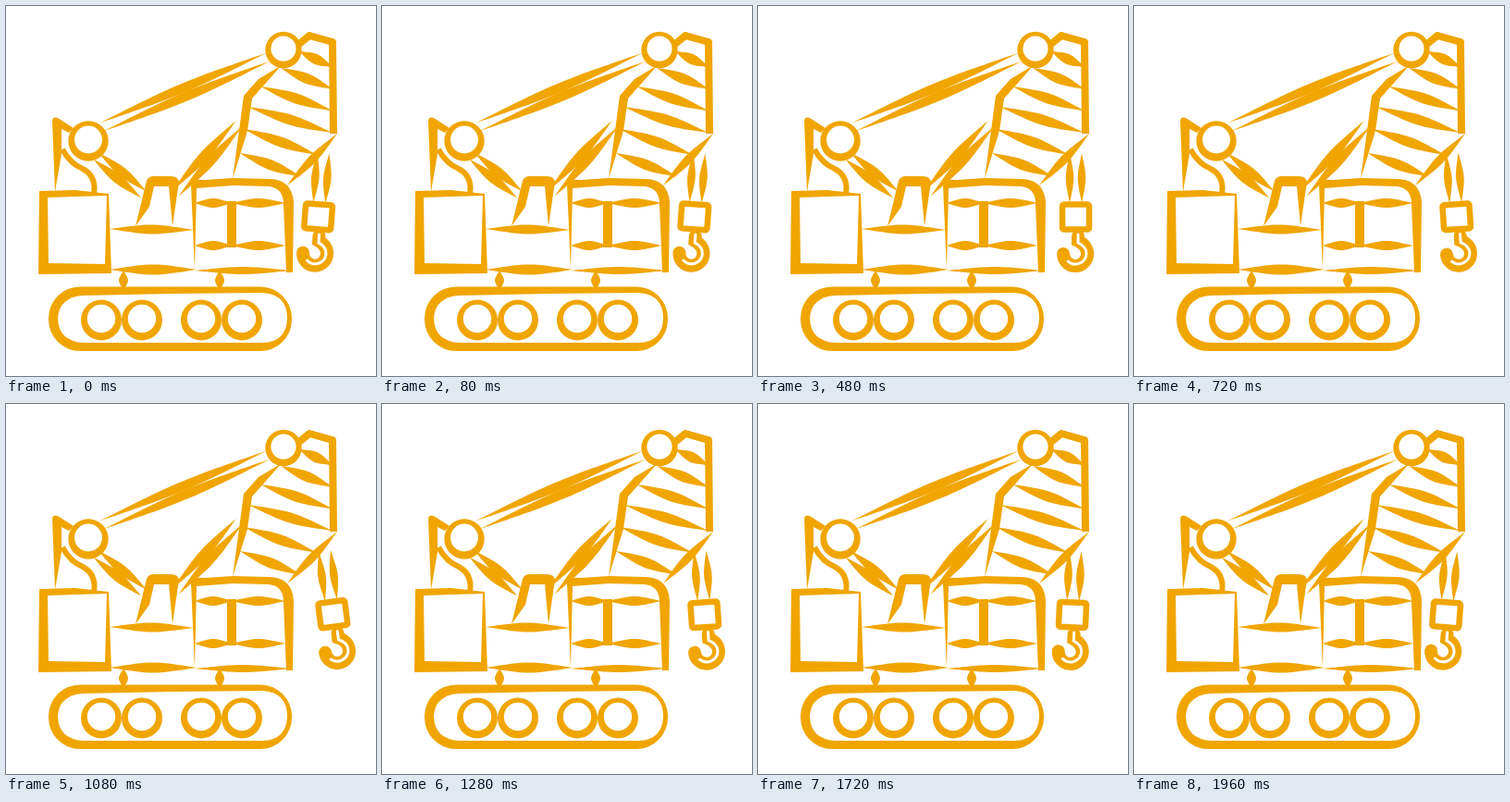
These frames come from a looping animation (400 by 400 pixels, 2 s). An HTML page:

```html
<!DOCTYPE html>
<html lang="en">
<head>
<meta charset="utf-8">
<title>Crane</title>
<style>
  html, body { margin: 0; width: 100%; height: 100%; overflow: hidden; background: #fff; }
  svg { display: block; width: 100vw; height: 100vh; }
  .line { fill: none; stroke: #f0a500; stroke-linejoin: round; }
</style>
</head>
<body>
<svg viewBox="0 0 400 400" fill="#f0a500" fill-rule="evenodd">
  <g id="machine">
    <!-- tracks -->
    <rect x="46" y="303.5" width="263" height="69.5" rx="34"/>
    <path d="M83 313 L180 311 L278 310 Q304 312 304 338 Q303 363 278 364 H83 Q57 362 56 338 Q57 315 83 313 Z" fill="#fff"/>
    <!-- rear box -->
    <path d="M36 200 L75 199 L111 203 L114 289 L35 290 Z M45 207 L109 205 L107 279 L46 278 Z"/>
    <!-- cabin -->
    <path d="M200 193 Q203 187 215 188 L245 186 L286 187 Q309 188 311 212 L310 288 H303 L300 214 Q300 197 284 195 L245 194 L206 197 L204 286 Z"/>
    <path class="line" d="M244 211 V261" stroke-width="10"/>
    <!-- mast foot -->
    <path d="M140 238 L152 189 Q154 184 160 184 H178 Q186 184 187 190 L180 238 L176 195 H160 L155 217 Z"/>
    <!-- rear pylon -->
    <path d="M50 125 Q50 119 56 121 L73 132 L68 137 L60 133 V160 L53 201 Z"/>
    <path class="line" d="M61 155 Q70 171 83 176 Q98 184 95 203" stroke-width="6"/>
    <!-- boom frame -->
    <path class="line" d="M317 41 L328 32 L353 39 L354 138" stroke-width="8"/>
    <path d="M257 97 L273 79 L298 64 L266 100 L261 135 L245 187 Z"/>
  </g>
  <g id="hook">
    <rect class="line" x="329" y="214.5" width="29" height="27" rx="2" stroke-width="6.5"/>
    <g fill="none" stroke-linecap="round">
      <path d="M346 249 V254 Q356 259 356 268 A13 13 0 0 1 330 268" stroke="#f0a500" stroke-width="14"/>
      <path d="M346 247 V256 Q355 260 355 268 A12 12 0 0 1 335 276" stroke="#fff" stroke-width="3"/>
    </g>
  </g>
</svg>
<script>
const machine = document.getElementById('machine');
const hook = document.getElementById('hook');
const DURATION = 2000, STEP = 40;

function addPath(parent, d) {
  const path = document.createElementNS('http://www.w3.org/2000/svg', 'path');
  path.setAttribute('d', d);
  parent.append(path);
}

// A stroke that swells to the given width halfway and ends in points.
function spindle(parent, x1, y1, x2, y2, width = 10) {
  const swell = width * 2 / 3 / Math.hypot(x2 - x1, y2 - y1);
  const nx = (y1 - y2) * swell, ny = (x2 - x1) * swell;
  const mx = (x1 + x2) / 2, my = (y1 + y2) / 2;
  const side = (s, x, y) => {
    const control = `${mx + s * nx} ${my + s * ny}`;
    return `C${control} ${control} ${x} ${y}`;
  };
  addPath(parent, `M${x1} ${y1}${side(1, x2, y2)}${side(-1, x1, y1)}Z`);
}

// Two parallel spindles, the given gap apart.
function twin(parent, x1, y1, x2, y2, gap, width) {
  const shift = gap / 2 / Math.hypot(x2 - x1, y2 - y1);
  const nx = (y1 - y2) * shift, ny = (x2 - x1) * shift;
  for (const s of [-1, 1]) {
    spindle(parent, x1 + s * nx, y1 + s * ny, x2 + s * nx, y2 + s * ny, width);
  }
}

const disc = (x, y, r) => `M${x - r} ${y}a${r} ${r} 0 1 0 ${2 * r} 0a${r} ${r} 0 1 0 ${-2 * r} 0Z`;

// Rings are heavier below, as their holes sit a little high.
const ring = (x, y, r) => addPath(machine, disc(x, y, r) + disc(x, y - r * 0.07, r * 0.69));

for (const middle of [125, 233]) {
  for (const side of [-22, 22]) ring(middle + side, 339.5, 22);
}
ring(89, 146, 21.7);
ring(300, 47.5, 19.7);

for (const x of [127, 231]) spindle(machine, x, 286, x, 307);
for (const y of [213, 259]) {
  spindle(machine, 204, y, 244, y);
  spindle(machine, 244, y, 302, y);
}
spindle(machine, 112, 241, 203, 242);
spindle(machine, 112, 285, 206, 285, 11);
spindle(machine, 204, 286, 308, 286, 8);
spindle(machine, 304, 194, 358, 138, 9);

twin(machine, 103, 131, 284, 55, 9.5, 10);
twin(machine, 97, 162, 149, 204, 9, 10);
twin(machine, 183, 203, 252, 127, 9, 10);

// Boom rungs run from the bent left edge to the right edge, which turns in below.
for (let i = 0; i < 6; i++) {
  const y = 49 + 17 * i + i * i;
  const x = y < 97 ? 317 - (y - 49) * 1.1 : 264 - (y - 97) * 0.18;
  spindle(machine, x, y, 353 - 17 * Math.max(0, i - 3), 66 + 23.7 * i, 11);
}

twin(hook, 343.5, 159, 343.5, 213, 13, 8.5);

function bezierEase(x, x1, y1, x2, y2) {
  const at = (t, a, b) => 3 * (1 - t) ** 2 * t * a + 3 * (1 - t) * t * t * b + t ** 3;
  let low = 0, high = 1;
  for (let i = 0; i < 24; i++) {
    const mid = (low + high) / 2;
    if (at(mid, x1, x2) < x) low = mid; else high = mid;
  }
  return at(low, y1, y2);
}

// The hook leaves its left end gently and turns sharply at the right end.
function draw(time) {
  const phase = Math.floor((time % DURATION) / STEP) * STEP / DURATION;
  const swing = bezierEase(1 - Math.abs(1 - 2 * phase), 0.333, 0, 0.833, 0.833);
  hook.setAttribute('transform', `rotate(${4.4 - 13 * swing} 343 151)`);
}

const start = performance.now();
function tick() {
  draw(performance.now() - start);
  requestAnimationFrame(tick);
}
tick();
</script>
</body>
</html>
```
